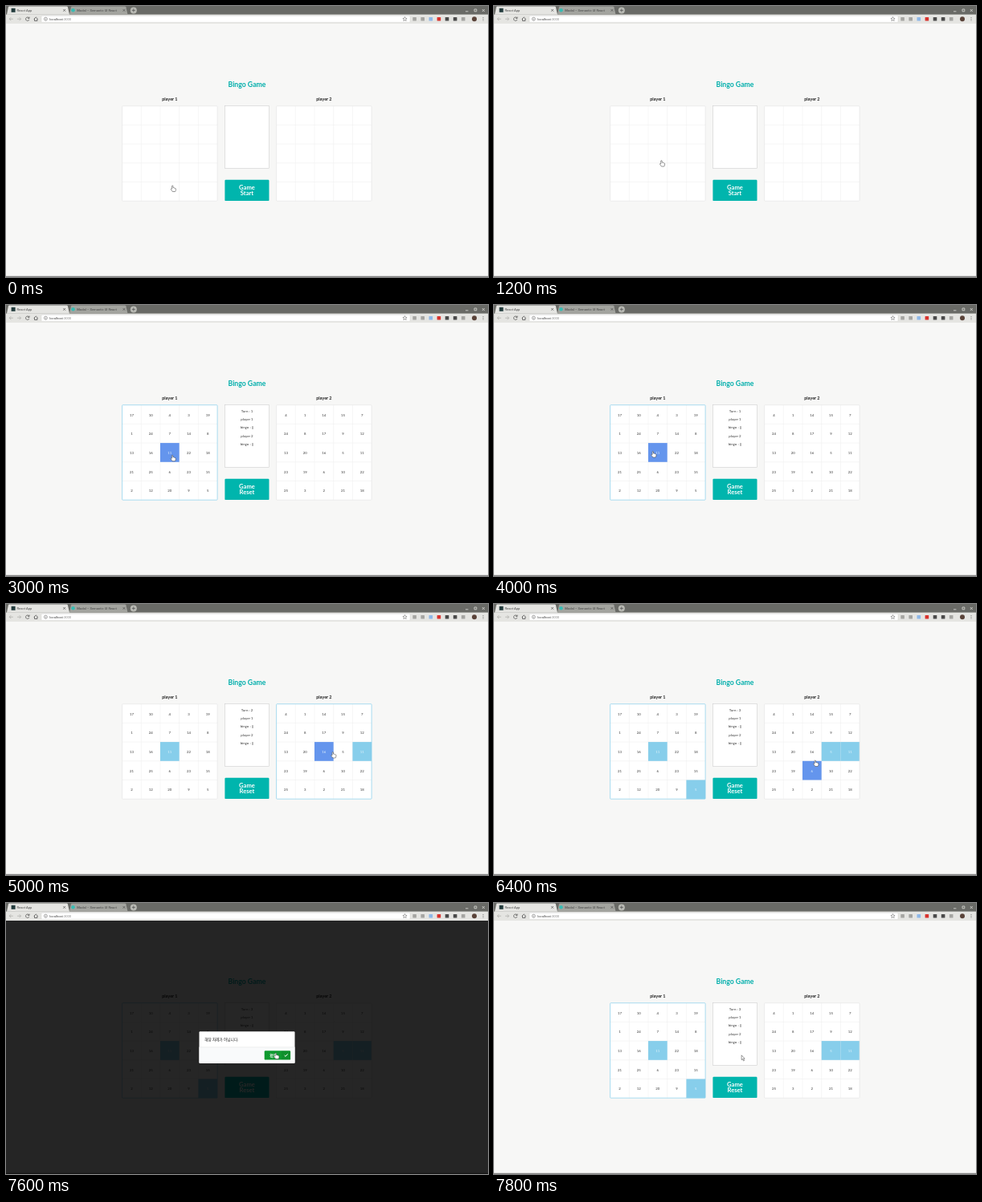
An HTML page that plays this animation: 600 by 338 pixels, repeating every 8000 ms.

```html
<!DOCTYPE html>
<html lang="en">
<head>
<meta charset="utf-8">
<title>Bingo Game</title>
<style>
html, body { margin: 0; width: 100%; height: 100%; overflow: hidden; background: #f7f7f6; }
svg { display: block; width: 100vw; height: 100vh; }
text { font-family: Lato, sans-serif; }
.mid { text-anchor: middle; }
.ui text { font: 4.1px Roboto, sans-serif; fill: #444; }
.ko { font-family: "Noto Sans CJK KR", "Noto Sans CJK", sans-serif; }
.line { fill: none; stroke: #555; stroke-width: .8; }
.pale { stroke: #b0b0ad; }
.thin { stroke-width: .5; }
</style>
</head>
<body>
<svg id="stage" viewBox="0 0 600 338" preserveAspectRatio="none">
  <rect width="600" height="338" fill="#f7f7f6"/>
  <g id="page"></g>
  <rect y="336.8" width="600" height="1.2" fill="#868686"/>
  <g id="modal">
    <rect y="22" width="600" height="316" opacity=".85"/>
    <rect x="240.5" y="160.3" width="119" height="39.7" rx="1.2" fill="#fff"/>
    <path d="M240.5 179.8H359.5V198.8Q359.5 200 358.3 200H241.7Q240.5 200 240.5 198.8Z" fill="#f9fafb"/>
    <path d="M240.5 179.8H359.5" stroke="#dedede" stroke-width=".5"/>
    <text class="ko" x="247.3" y="171.7" font-size="4.7" fill="#222">해당 차례가 아닙니다.</text>
    <rect id="ok" rx="1.2"/>
    <path d="M343 184.2H353Q354.1 184.2 354.1 185.4V194.4Q354.1 195.6 353 195.6H343Z" opacity=".06"/>
    <text class="ko mid" x="332.6" y="191.7" font-size="4.7" font-weight="700" fill="#fff">확인</text>
    <path d="M346.6 190L348 191.4L350.6 188.4" fill="none" stroke="#fff"/>
  </g>
  <g class="ui" id="chrome">
    <rect width="600" height="11" fill="#696a66"/>
    <rect y="10.6" width="600" height="11.4" fill="#e5e5e2"/>
    <path d="M79 10.6L81 1.2Q81.2 .6 82 .6H148Q149 .6 149.3 1.2L151.5 10.6Z" fill="#a3a49f"/>
    <path d="M1 10.7L3 1Q3.2 .4 4 .4H75.5Q76.5 .4 76.8 1L79 10.7Z" fill="#e5e5e2"/>
    <rect x="6.6" y="2.8" width="5" height="5" fill="#223b3c"/>
    <circle cx="83.5" cy="5.3" r="2.3" fill="#38bdb4"/>
    <text x="13.6" y="6.8">React App</text>
    <text x="88.3" y="6.8">Modal – Semantic UI React</text>
    <path class="line" d="M71.3 4.1l2.6 2.6m0-2.6l-2.6 2.6M145.6 4.1l2.6 2.6m0-2.6l-2.6 2.6"/>
    <circle cx="158.8" cy="5.4" r="4" fill="#b9bab4"/>
    <path class="line" d="M156.8 5.4h4m-2-2v4"/>
    <path d="M572 6.8h3.4M583 4h2.8v2.8h-2.8zM592.8 4l3 3m0-3l-3 3" fill="none" stroke="#deded9" stroke-width=".8"/>
    <rect x="44" y="12.2" width="459" height="8.2" rx="1" fill="#fff" stroke="#d0d0cd" stroke-width=".4"/>
    <path class="line pale" d="M8.8 16.2H4.2l2-2m-2 2l2 2M14 16.2h4.6l-2-2m2 2l-2 2"/>
    <path class="line" d="M28.7 15.2a2.2 2.2 0 1 0 .1 1.8M29 13.6v1.8h-1.8"/>
    <path class="line" d="M34.7 16.3l2.5-2.3l2.5 2.3M35.5 16v2.5h3.4V16"/>
    <circle class="line thin" cx="49.4" cy="16.2" r="2"/>
    <path class="line thin" d="M49.4 15v.4m0 .5v1.5"/>
    <text x="54.2" y="17.7">localhost<tspan fill="#8a8a8a">:3000</tspan></text>
    <path class="line thin" d="M496.5 13.6l.8 1.7l1.8.2l-1.4 1.2l.4 1.8l-1.6-.9l-1.6.9l.4-1.8l-1.4-1.2l1.8-.2z"/>
    <circle cx="583" cy="16.2" r="3" fill="#5a4339"/>
    <path class="line" d="M594 14.1v.9m0 .8v.9m0 .8v.9"/>
  </g>
  <g id="cursor" stroke="#333" stroke-width=".5" fill="#fff" stroke-linejoin="round">
    <path id="hand" d="M-1.9 .6V-3.1q.7-.9 1.4 0V-.9q1-.3 1.2.3q.9-.2 1.1.4q1-.1 1.1.7V2q-.2 1.2-.8 2H-1.2Q-2.2 2.6-3.3.9q.2-1 1.4-.3z"/>
    <path id="arrow" d="M-1.9-3.7V2.1L-.6 1L.5 3.4L1.6 2.9L.5.6H2.2Z"/>
  </g>
</svg>
<script>
const LOOP = 8000, STEP = 200, CELL = 23.7, SIDE = CELL * 5, TOP = 124.7;
const START = 2400, OPEN = 6600, PRESS = 7600, CLOSE = 7800;
const PICKS = [{ at: 4200, num: "11" }, { at: 5800, num: "5" }];
const BUTTON = { x: 272.4, y: 216.7, width: 55.1, height: 26.4 };
const OK = { x: 321.7, y: 184.2, width: 32.4, height: 11.4 };
const BOARDS = [
  { x: 144.6, card: "17 10 4 3 19 1 24 7 14 8 13 16 11 22 18 21 25 6 23 15 2 12 20 9 5" },
  { x: 336.6, card: "4 1 14 15 7 24 8 17 9 12 13 20 16 5 11 23 19 6 10 22 25 3 2 21 18" }
];
// the pointer glides to each spot between two times, then rests
const HOME = { x: 208.5, y: 227.5 };
const GLIDES = [
  { from: 0, to: 400, x: 200.5, y: 192 },
  { from: 1000, to: 2000, x: 288.5, y: 231.5 },
  { from: 2200, to: 3200, x: 199, y: 186 },
  { from: 4200, to: 5000, x: 408, y: 188 },
  { from: 5000, to: 5400, x: 415, y: 188 },
  { from: 5800, to: 6400, x: 401, y: 198.5 },
  { from: 6400, to: 6800, x: 346, y: 203.5 },
  { from: 6800, to: 7200, x: 337, y: 190.5 },
  { from: PRESS, to: CLOSE, x: 310, y: 193.5 }
];

const $ = id => document.getElementById(id);
const set = (el, attrs) => {
  for (const k in attrs) el.setAttribute(k, attrs[k]);
  return el;
};
const show = (el, on) => set(el, { visibility: on ? "visible" : "hidden" });

function add(tag, attrs, str = "", parent = $("page")) {
  const el = document.createElementNS("http://www.w3.org/2000/svg", tag);
  el.textContent = str;
  return parent.appendChild(set(el, attrs));
}
const label = (str, x, y, size, fill, weight = 400) =>
  add("text", { class: "mid", x, y, "font-size": size, fill, "font-weight": weight }, str);

function buildBoard(b, n) {
  const area = { x: b.x, y: TOP, width: SIDE, height: SIDE };
  label("player " + (n + 1), b.x + SIDE / 2, 117.5, 5.5, "#222", 700);
  add("rect", { ...area, fill: "#fff" });
  let grid = "";
  for (let i = 1; i < 5; i++)
    grid += `M${b.x + i * CELL} ${TOP}v${SIDE}M${b.x} ${TOP + i * CELL}h${SIDE}`;
  add("path", { d: grid, stroke: "#ededed", "stroke-width": .5 });
  b.cells = b.card.split(" ").map((num, i) => {
    const spot = { x: b.x + i % 5 * CELL, y: TOP + Math.floor(i / 5) * CELL, width: CELL, height: CELL };
    return { num, spot, rect: add("rect", spot), text: label(num, spot.x + CELL / 2, spot.y + 13.8, 4.3) };
  });
  b.frame = add("rect", { ...area, fill: "none", rx: .8, "stroke-width": .7 });
}

label("Bingo Game", 300, 100.8, 8.7, "#00aeab", 700);
BOARDS.forEach(buildBoard);
add("rect", { x: 272.5, y: 124.5, width: 55, height: 78, fill: "#fff", stroke: "#cfcfcf", "stroke-width": .6 });
const info = ["", "player 1", "bingo : []", "player 2", "bingo : []"]
  .map((s, i) => label(s, 300, 133.6 + i * 10.35, 4.4, "#333"));
const button = add("rect", { ...BUTTON, rx: 1.2 });
label("Game", 300, 229.1, 7.6, "#fff", 700);
const action = label("", 300, 236.3, 7.6, "#fff", 700);
set($("ok"), OK);

// toolbar buttons
["#a5a5a2", "#a5a5a2", "#8fb8e8", "#d8332e", "#4a4a4a", "#4a4a4a", "#a5a5a2"].forEach((fill, i) =>
  add("rect", { x: 506.3 + i * 10.1, y: 13.9, width: 4.6, height: 4.6, rx: .5, fill }, "", $("chrome")));

function pointer(t) {
  let { x, y } = HOME;
  for (const g of GLIDES) {
    const p = Math.min(1, Math.max(0, (t - g.from) / (g.to - g.from)));
    const k = p * p * (3 - 2 * p);
    x += (g.x - x) * k;
    y += (g.y - y) * k;
  }
  return { x, y };
}

function draw(time) {
  const t = Math.floor(time % LOOP / STEP) * STEP;
  const { x, y } = pointer(t);
  const over = r => x - 1 >= r.x && x - 1 < r.x + r.width && y - 2 >= r.y && y - 2 < r.y + r.height;
  const playing = t >= START, modal = t >= OPEN && t < CLOSE;
  const picked = PICKS.filter(p => p.at <= t).map(p => p.num);

  BOARDS.forEach((b, n) => {
    const active = playing && picked.length % 2 === n;
    set(b.frame, { stroke: active ? "#87ceeb" : "#e6e6e6" });
    for (const c of b.cells) {
      const hover = playing && !modal && over(c.spot);
      const marked = picked.includes(c.num);
      set(c.rect, { fill: hover ? "#6495ed" : marked ? "#87ceeb" : "none" });
      set(c.text, { fill: hover || marked ? "#e6f5fc" : "#333" });
      show(c.text, playing);
    }
  });
  info.forEach(el => show(el, playing));
  info[0].textContent = "Turn : " + (picked.length + 1);
  action.textContent = playing ? "Reset" : "Start";
  set(button, { fill: !modal && over(BUTTON) ? "#009c95" : "#00b5ad" });

  set($("ok"), { fill: t >= PRESS ? "#0f9a2f" : over(OK) ? "#16ab39" : "#21ba45" });
  show($("modal"), modal);

  const arrow = t >= CLOSE || (modal && !over(OK));
  show($("arrow"), arrow);
  show($("hand"), !arrow);
  set($("cursor"), { transform: `translate(${x} ${y})` });
}

function tick() {
  draw(performance.now());
  requestAnimationFrame(tick);
}
tick();
</script>
</body>
</html>
```
